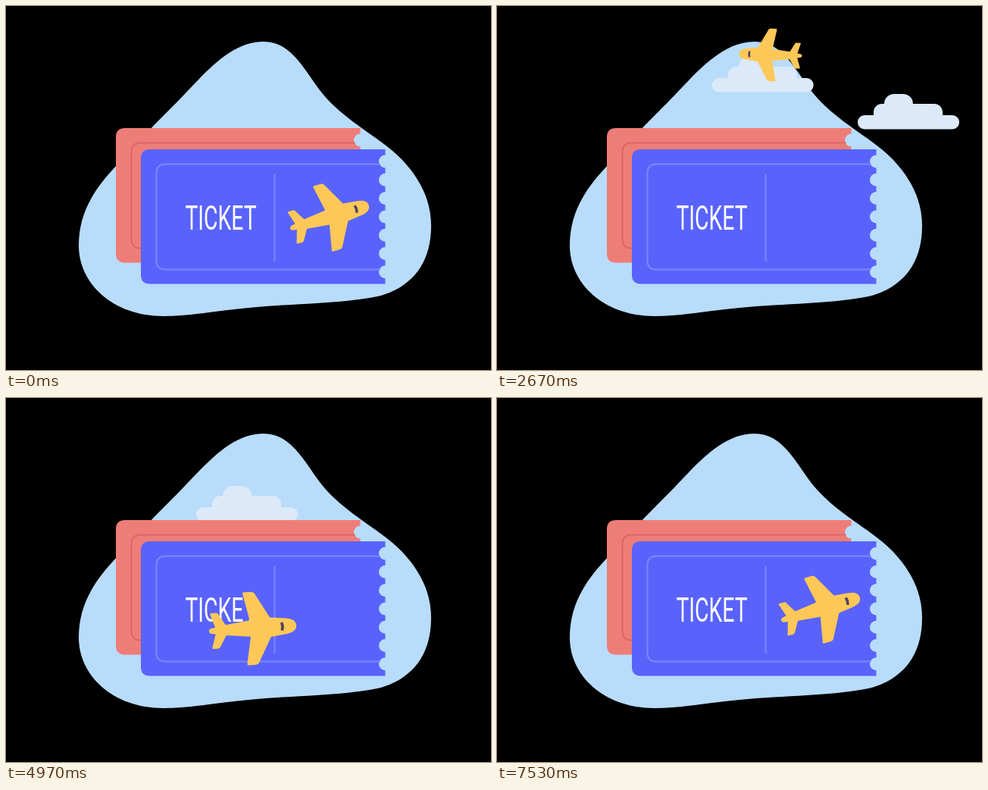
Recreate the animation shown at these times as an HTML page. Size 640 by 480 pixels, loop 7.56 s.

```html
<!DOCTYPE html>
<html lang="en">
<head>
<meta charset="utf-8">
<title>Flight ticket</title>
<style>
  html, body { margin: 0; width: 100%; height: 100%; overflow: hidden; background: #000; }
  svg { display: block; width: 100%; height: 100%; }
  .label { font: 400 45px Roboto, "Liberation Sans", sans-serif; fill: #fff; text-anchor: middle; }
</style>
</head>
<body>
<svg viewBox="0 0 640 480">
  <defs>
    <g id="cloudShape" fill="#dbe9f9">
      <rect y="28" width="134" height="18.5" rx="9"/>
      <rect x="21" y="13" width="91" height="32" rx="11"/>
      <rect x="35" width="38" height="30" rx="13"/>
    </g>
    <path id="halfPlane" d="M57 .5V0C57-6 52-9 42-10L25-12 8-43Q6.500-45 4-45H-5Q-7-45-6.500-43L0-10-30-6.500-38-20Q-39-22-41-22H-47Q-49-22-48-20L-43-4-49-3Q-51-2-51 .5Z"/>
  </defs>
  <path fill="#b8dcfa" d="M340 47C378 47 394 86 418 116C450 154 494 173 523 203C548 230 561 258 561 290C561 340 535 372 490 383C440 393 380 392 320 398C270 403 240 409 208 409C140 409 96 365 96 316C96 265 125 232 150 206C190 161 205 148 235 117C270 80 300 47 340 47Z"/>
  <use id="cloudA" href="#cloudShape"/>
  <use id="cloudB" href="#cloudShape"/>
  <g transform="translate(145 161)">
    <path class="ticket" fill="#ef7d77"/>
    <path class="border" fill="none" stroke="#db666b" stroke-width="2"/>
  </g>
  <g transform="translate(178 189)">
    <path class="ticket" fill="#5963fb"/>
    <path class="border" fill="none" stroke="#7f87fb" stroke-width="2"/>
    <path d="M176.500 32.500V147.500" stroke="#7f87fb" stroke-width="2"/>
  </g>
  <text class="label" transform="translate(283.500 295) scale(.63 1)">TICKET</text>
  <g id="plane">
    <g fill="#fdc857">
      <use href="#halfPlane"/>
      <use href="#halfPlane" transform="scale(1 -1)"/>
    </g>
    <path fill="#4d4560" d="M37.500-4.500L40.500-5.500Q43 0 40.500 5.500L37.500 4.500Q39 0 37.500-4.500Z"/>
  </g>
</svg>
<script>
const LOOP = 7560;
const byId = id => document.getElementById(id);
const setPath = (selector, d) =>
  document.querySelectorAll(selector).forEach(el => el.setAttribute('d', d));

// Rounded on the left, seven scallops on the right.
let outline = 'M12 0H322.5';
for (let i = 0; i < 7; i++) {
  const y = 16 + i * 24.3;
  outline += `V${y - 8.5}A8.5 8.5 0 0 0 322.5 ${y + 8.5}`;
}
setPath('.ticket', outline + 'V177.5H12Q0 177.5 0 165.5V12Q0 0 12 0Z');
setPath('.border', 'M315.5 19.5H32.5Q20.5 19.5 20.5 31.5V146.5Q20.5 158.5 32.5 158.5H315.5');

// The plane follows one curve; each leg ends at the matching time.
const legs = [
  'M424 279',
  'C447 272.2 469 266.2 492 260',
  'C617 226 615 139 548 95',
  'C489 57 197 53 148 87',
  'C0 190 80 318 322 304',
  'C357 301.5 393 288 424 279'
];
const times = [0, 770, 1830, 3570, 4970, 5600];
const sizes = [1, 1.14, .86, .76, 1.07, 1];

const route = document.createElementNS('http://www.w3.org/2000/svg', 'path');
const distances = legs.map((_, i) => {
  route.setAttribute('d', legs.slice(0, i + 1).join(''));
  return route.getTotalLength();
});

// Smooth curve through the values, resting at both ends.
function glide(values, t) {
  const last = times.length - 1;
  if (t >= times[last]) return values[last];
  const slope = i => i > 0 && i < last
    ? (values[i + 1] - values[i - 1]) / (times[i + 1] - times[i - 1]) : 0;
  const i = times.findIndex(time => time > t) - 1;
  const span = times[i + 1] - times[i];
  const u = (t - times[i]) / span, v = 1 - u;
  return values[i] * v * v * (1 + 2 * u) + values[i + 1] * u * u * (3 - 2 * u) +
    span * u * v * (slope(i) * v - slope(i + 1) * u);
}

function fly(t) {
  const s = glide(distances, t);
  const at = route.getPointAtLength(s);
  const back = route.getPointAtLength(Math.max(0, s - 2));
  const ahead = route.getPointAtLength(s + 2);
  const heading = Math.atan2(ahead.y - back.y, ahead.x - back.x) * 180 / Math.PI;
  byId('plane').setAttribute('transform',
    `translate(${at.x} ${at.y}) rotate(${heading}) scale(${glide(sizes, t)})`);
}

function drift(id, t, from, to, startX, speed, y) {
  const el = byId(id);
  el.setAttribute('visibility', t >= from && t < to ? 'visible' : 'hidden');
  el.setAttribute('transform', `translate(${startX - speed * (t - from)} ${y})`);
}

function draw(t) {
  drift('cloudA', t, 715, 4710, 490, .1055, 67);
  drift('cloudB', t, 2420, 6945, 500.5, .0978, 116);
  fly(t);
}

const start = performance.now();
function tick() {
  draw((performance.now() - start) % LOOP);
  requestAnimationFrame(tick);
}
tick();
</script>
</body>
</html>
```
